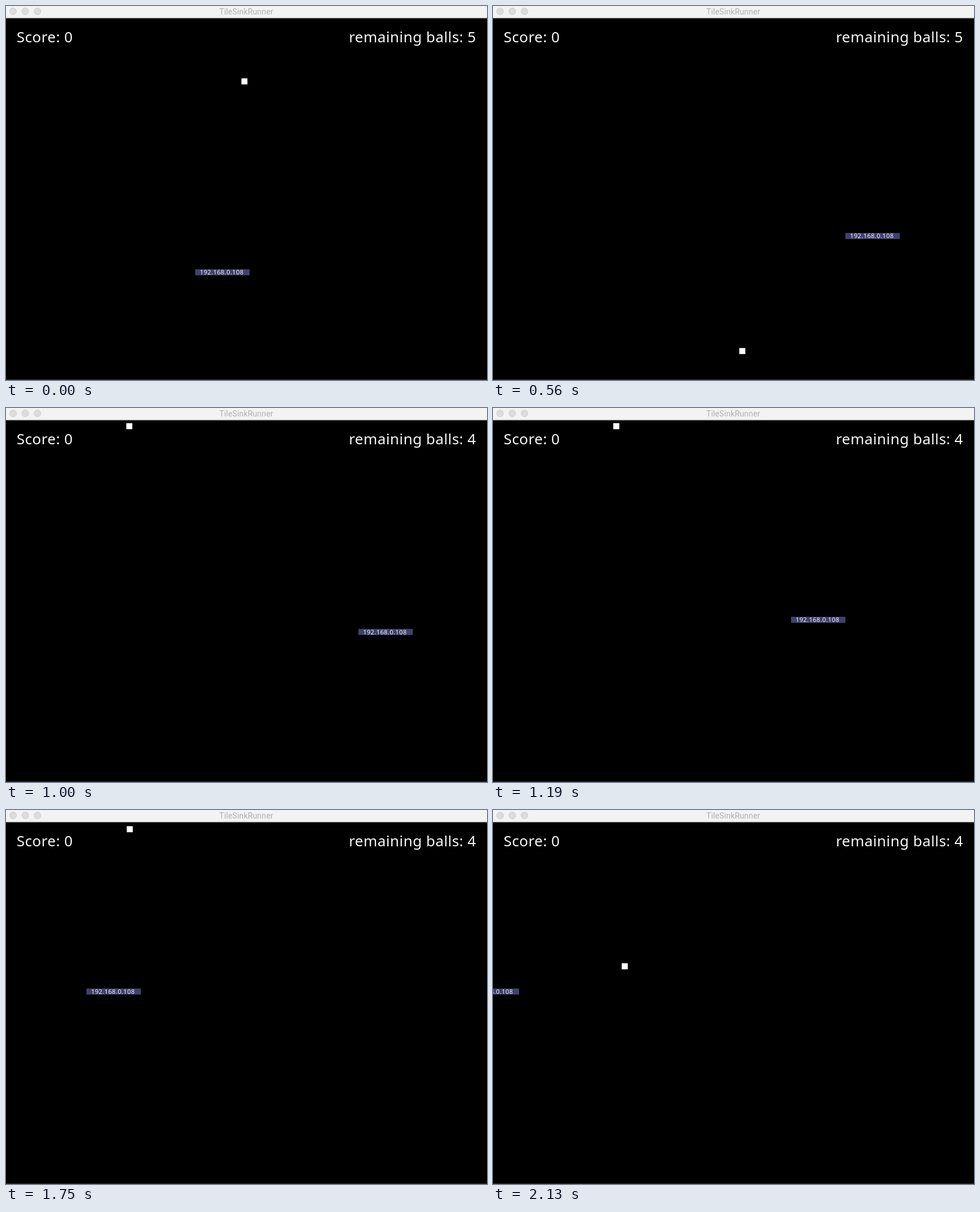
An HTML page for the animation above (2200 ms loop, 849 px wide and 659 px high).

```html
<!DOCTYPE html>
<html lang="en">
<head>
<meta charset="utf-8">
<title>Ball game</title>
<style>
  html, body { margin: 0; width: 100%; height: 100%; overflow: hidden; background: #000; }
  svg { display: block; width: 849px; height: 659px; }
  .hud { font: 26px "Noto Sans", sans-serif; letter-spacing: .42px; fill: #f8f8f8; }
  .title { font: 14px Roboto, sans-serif; letter-spacing: .15px; fill: #b0b0b0; text-anchor: middle; }
  .label { font: 11px "Noto Sans", sans-serif; letter-spacing: .42px; fill: #f0f0f6; }
</style>
</head>
<body>
<svg viewBox="0 0 849 659">
  <rect width="849" height="659"/>
  <g id="paddle">
    <rect width="96" height="10.67" fill="#41416f"/>
    <text class="label" x="8.2" y="9.4">192.168.0.108</text>
  </g>
  <rect id="ball" width="10.67" height="10.67" fill="#fff"/>
  <text class="hud" x="18.7" y="64">Score: 0</text>
  <text class="hud" x="605.2" y="64">remaining balls: <tspan id="left">5</tspan></text>
  <rect width="849" height="21.33" fill="#f3f3f3"/>
  <rect y="20.27" width="849" height="1.06" fill="#d8d8d8"/>
  <g fill="#dcdcdc" stroke="#cecece">
    <circle cx="12.5" cy="9.5" r="6"/>
    <circle cx="34" cy="9.5" r="6"/>
    <circle cx="55.5" cy="9.5" r="6"/>
  </g>
  <text class="title" x="424" y="15">TileSinkRunner</text>
  <rect y="658" width="849" height="1" fill="#333"/>
</svg>
<script>
const LOOP = 2200, TICK = 62.5, LAST = 34;
const UNIT = 32 / 3, TOP = 26.67;
const $ = id => document.getElementById(id);
const place = (id, x, y) => $(id).setAttribute("transform", `translate(${x} ${y})`);

// Paddle updates arrive every 2.6 ticks: columns across, rows up.
const columns = [1, 1, 1, 1, 0, -1, -1, -1, -1, -1, -1, -1, -1];
const rows = [2, 2, 2, 1, 0, 0, 2, 2, 1, 1, 1, 0, 0];
const sum = (list, n) => list.slice(0, n).reduce((a, b) => a + b, 0);

// Points are [tick, x, root of the fallen distance].
const firstFall = [[0, 415.5, 10.04], [5, 425.1, 17.1], [9, 434.7, 24], [10, 436.2, 24.95]];
const secondFall = [[0, 212.3, 0], [27, 212.3, 0], [28, 213.1, 1.35], [34, 227.2, 15.6]];

function along(points, tick) {
  const i = Math.max(1, points.findIndex(p => p[0] >= tick));
  const a = points[i - 1], b = points[i];
  const k = (tick - a[0]) / (b[0] - a[0]);
  return [1, 2].map(j => a[j] + (b[j] - a[j]) * k);
}

function draw(now) {
  const tick = Math.min(LAST, Math.floor((now % LOOP + 3) / TICK));
  const updates = Math.max(0, Math.floor((tick - 1.5) / 2.6) + 1);
  place("paddle", 334 + 96 * sum(columns, updates), 463.9 - UNIT * sum(rows, updates));

  const first = tick <= 10;
  const [x, root] = along(first ? firstFall : secondFall, tick);
  place("ball", x, TOP + root * root);
  $("left").textContent = first ? 5 : 4;
}

const start = performance.now();
function loop() {
  draw(performance.now() - start);
  requestAnimationFrame(loop);
}
loop();
</script>
</body>
</html>
```
